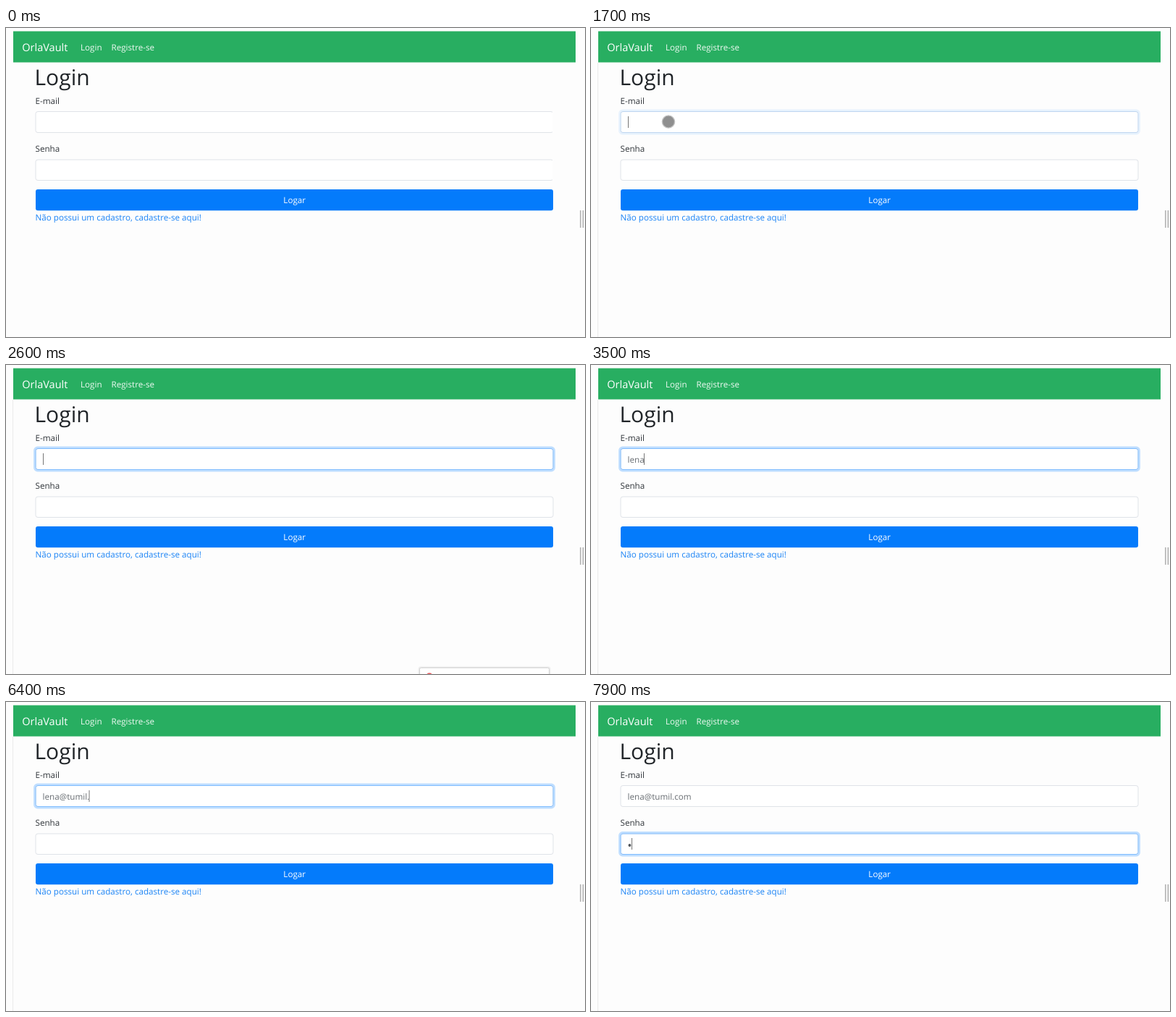
An HTML page for the animation above (8000 ms loop, 800 by 427 pixels).

```html
<!DOCTYPE html>
<html lang="pt-BR">
<head>
<meta charset="utf-8">
<title>Login</title>
<style>
  html, body { margin: 0; width: 100%; height: 100%; overflow: hidden; background: #fdfdfd; }
  svg { display: block; width: 800px; height: 427px; }
  text { font: 11.65px "Open Sans", "Noto Sans", sans-serif; fill: #30353a; text-rendering: geometricPrecision; }
  .nav text { fill: #f0faf4; }
  .nav .brand { font-size: 14.5px; fill: #fff; }
  .title { font-size: 30px; font-weight: 500; fill: #212529; }
  .typed { fill: #686d72; }
  .link { fill: #1a83f5; }
  .field { fill: #fff; stroke: #dfe3e8; }
  .border { fill: none; stroke: #80bdff; }
  .glow { fill: none; stroke: #bfdeff; stroke-width: 2.6; }
  .caret { stroke: #777; stroke-width: 1; }
</style>
</head>
<body>
<svg viewBox="0 0 800 427">
  <rect width="800" height="427" fill="#fdfdfd"/>
  <path id="edge" d="M9.5 48V427" stroke="#ebebeb"/>
  <g class="nav">
    <rect x="10" y="4.5" width="777" height="43" fill="#28ae61"/>
    <text class="brand" x="22.3" y="32">OrlaVault</text>
    <text x="103" y="31">Login</text>
    <text x="145.5" y="31">Registre-se</text>
  </g>

  <text class="title" x="39.5" y="79">Login</text>
  <text x="40.5" y="105">E-mail</text>
  <text x="40.5" y="171">Senha</text>

  <rect class="field" x="41" y="115.5" width="715" height="29" rx="3"/>
  <rect class="field" x="41" y="182" width="715" height="28.5" rx="3"/>
  <rect id="cover" x="755" y="114" width="3" height="98" fill="#fdfdfd"/>
  <g id="mailFocus">
    <rect class="glow" x="39.4" y="113.9" width="718.2" height="32.2" rx="4"/>
    <rect class="border" x="41" y="115.5" width="715" height="29" rx="3"/>
  </g>
  <g id="passFocus">
    <rect class="glow" x="39.4" y="180.4" width="718.2" height="31.7" rx="4"/>
    <rect class="border" x="41" y="182" width="715" height="28.5" rx="3"/>
  </g>

  <text id="mail" class="typed" x="50.6" y="134.8"></text>
  <circle id="bullet" cx="53.4" cy="198" r="1.9" fill="#50555a"/>
  <path id="caret" class="caret" d="M0 0V16"/>

  <rect x="41" y="223" width="715" height="29.3" rx="3" fill="#047bfb"/>
  <text x="398.7" y="242.3" text-anchor="middle" style="fill:#fff">Logar</text>
  <text class="link" x="40.5" y="266">Não possui um cadastro, cadastre-se aqui!</text>

  <path d="M793.8 252V276M797.4 252V276" stroke="#a9a9a9" stroke-width="1.4"/>

  <g id="popup">
    <rect x="569.5" y="416.5" width="183" height="20" rx="4" fill="#ededed"/>
    <rect x="571.5" y="418.5" width="179" height="20" rx="2" fill="#fff" stroke="#d2d2d2"/>
    <circle cx="585" cy="430.5" r="5" fill="#e8565a"/>
  </g>
  <circle id="pointer" r="8.6" fill="#8f8f8f" stroke="#c4c4c4" stroke-width="1.4"/>
</svg>
<script>
  const LOOP = 8000, STEP = 100, BLINK = 450;
  const FOCUS = 1650, TAB = 7100, SECRET = 7900;
  const MAIL = "lena@tumil.com";
  const KEYS = [3000, 3200, 3400, 3500, 4600, 5000, 5300, 5700, 6000, 6200, 6400, 6600, 6700, 6800];

  const el = {};
  document.querySelectorAll("svg [id]").forEach(n => el[n.id] = n);

  const show = (node, on) => node.style.opacity = Number(on);
  const fade = (t, start, a, b) => t < start ? 0 : t < start + 100 ? a : t < start + 200 ? b : 1;
  const bezier = (a, b, c, u) => a * (1 - u) ** 2 + 2 * b * u * (1 - u) + c * u * u;

  function drawPointer(t) {
    const p = Math.min(1, Math.max(0, (t - 800) / 500));
    const u = 1 - (1 - p) ** 1.5;
    const x = bezier(96, 148, 107, u), y = bezier(1, 95, 129.5, u);
    el.pointer.setAttribute("transform", `translate(${x} ${y})`);
    show(el.pointer, t >= 800 && t < 1900);
  }

  function drawCaret(t, count) {
    const inPass = t >= TAB;
    const last = t >= SECRET ? SECRET : inPass ? TAB : count ? KEYS[count - 1] : FOCUS;
    const x = inPass ? (t >= SECRET ? 56.5 : 51.5)
                     : count ? 50.4 + el.mail.getComputedTextLength() : 51.5;
    el.caret.setAttribute("transform", `translate(${x} ${inPass ? 188 : 122})`);
    show(el.caret, t >= FOCUS && (t - last) % (2 * BLINK) < BLINK);
  }

  function draw(now) {
    const t = Math.floor(now % LOOP / STEP) * STEP;
    const count = KEYS.filter(k => k <= t).length;
    const text = MAIL.slice(0, count);
    if (el.mail.textContent !== text) el.mail.textContent = text;

    show(el.edge, t >= 1700);
    show(el.cover, t < 1700);
    show(el.mailFocus, fade(t, 1700, 0.35, 0.8) * (1 - fade(t, TAB, 0.3, 0.8)));
    show(el.passFocus, fade(t, TAB, 0.25, 0.75));
    show(el.bullet, t >= SECRET);
    show(el.popup, t < 2600 || t >= 3000 ? 0 : t < 2800 ? 1 : 0.5);
    drawPointer(t);
    drawCaret(t, count);
  }

  const start = performance.now();
  function tick() {
    draw(performance.now() - start);
    requestAnimationFrame(tick);
  }
  tick();
</script>
</body>
</html>
```
